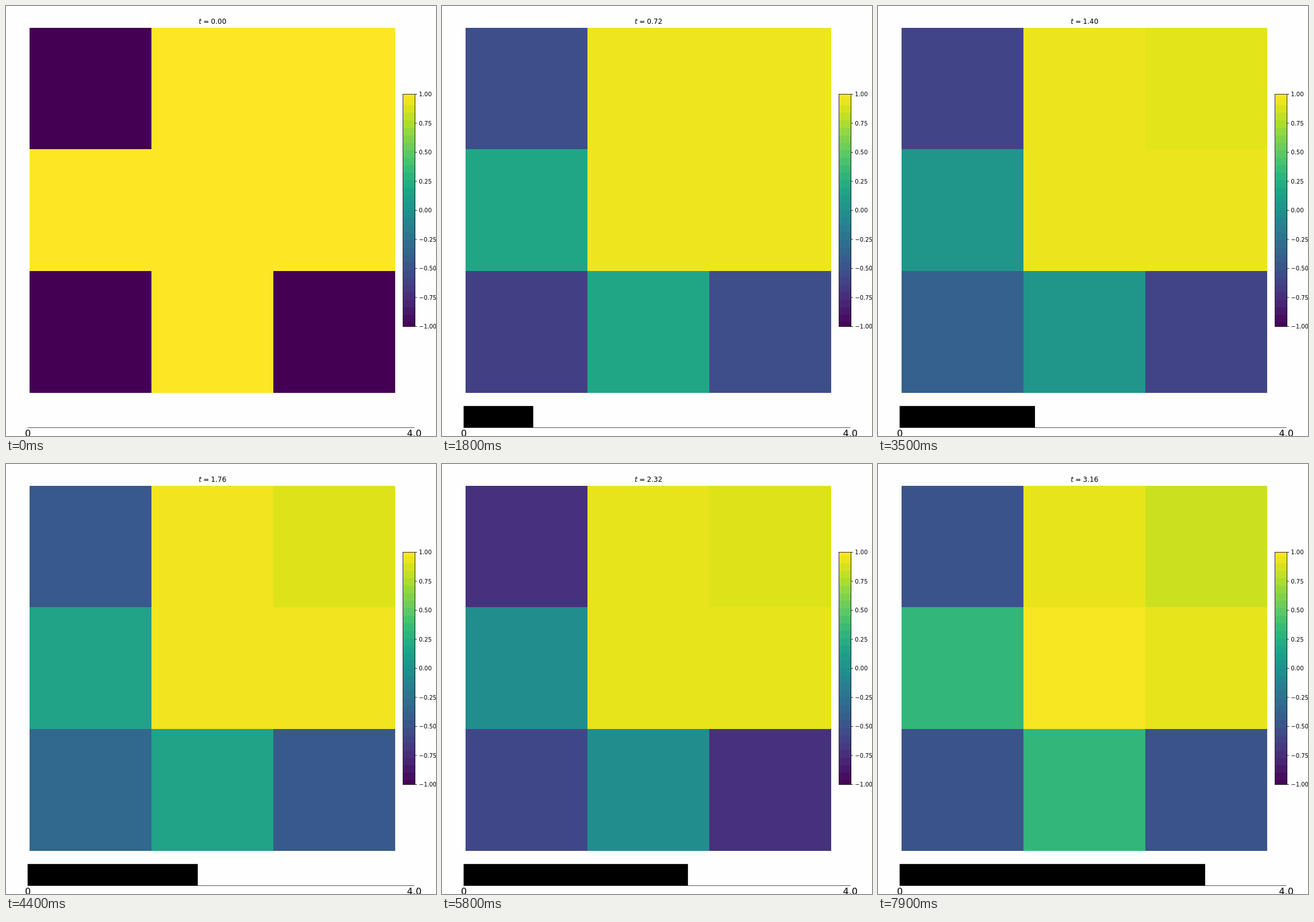
An HTML page that plays this animation: 748x748 px, repeating every 8000 ms.

```html
<!DOCTYPE html>
<html lang="en">
<head>
<meta charset="utf-8">
<title>Lattice evolution</title>
<style>
  html, body { margin: 0; width: 100%; height: 100%; overflow: hidden; background: #fefefe; }
  svg { display: block; width: 100vw; height: 100vh; }
  text { font-family: "DejaVu Sans", sans-serif; fill: #000; white-space: pre; }
</style>
</head>
<body>
<svg id="stage" viewBox="0 0 748 748"></svg>
<script>
const stage = document.getElementById('stage');

function add(tag, attrs, text) {
  const node = document.createElementNS('http://www.w3.org/2000/svg', tag);
  for (const key in attrs) node.setAttribute(key, attrs[key]);
  if (text !== undefined) node.textContent = text;
  stage.appendChild(node);
  return node;
}

// Viridis colour map, evenly spaced stops.
const viridis = ('440154 471365 482475 463480 414487 3b528b 355f8d 2f6c8e 2a788e 25848e 21918c ' +
  '1e9c89 22a884 2fb47c 44bf70 5ec962 7ad151 9bd93c bddf26 dfe318 fde725')
  .split(' ').map(hex => [0, 2, 4].map(i => parseInt(hex.slice(i, i + 2), 16)));

function colour(value) {
  const pos = Math.min(1, Math.max(0, (value + 1) / 2)) * (viridis.length - 1);
  const i = Math.min(viridis.length - 2, Math.floor(pos));
  const mix = viridis[i].map((c, k) => Math.round(c + (viridis[i + 1][k] - c) * (pos - i)));
  return `rgb(${mix})`;
}

// Smooth curve through knots without overshoot.
function curve(xs, ys) {
  const last = xs.length - 1;
  const rise = xs.slice(1).map((x, i) => (ys[i + 1] - ys[i]) / (x - xs[i]));
  const slope = xs.map((x, i) => {
    if (i === 0 || i === last) return 0;
    const a = rise[i - 1], b = rise[i];
    return a * b > 0 ? 2 * a * b / (a + b) : 0;
  });
  return x => {
    let i = 0;
    while (i < last - 1 && x > xs[i + 1]) i++;
    const w = xs[i + 1] - xs[i], u = (x - xs[i]) / w, v = 1 - u;
    return v * v * ((1 + 2 * u) * ys[i] + u * w * slope[i]) +
           u * u * ((1 + 2 * v) * ys[i + 1] - v * w * slope[i + 1]);
  };
}

// Magnetisation of each class of site; the lattice is mirror symmetric.
const times = [0, 0.32, 0.72, 1.12, 1.76, 2.32, 2.72, 3.16];
const sites = {
  end:    [-1, -0.8, -0.53, -0.69, -0.45, -0.72, -0.67, -0.49],
  link:   [1, 0.38, 0.18, -0.04, 0.16, -0.03, 0.42, 0.32],
  corner: [-1, -0.85, -0.625, -0.46, -0.33, -0.58, -0.79, -0.49],
  edge:   [1, 0.965, 0.954, 0.936, 0.955, 0.93, 0.93, 0.925],
  centre: [1, 0.965, 0.954, 0.936, 0.955, 0.93, 0.93, 0.98],
  far:    [1, 0.965, 0.954, 0.936, 0.895, 0.895, 0.87, 0.84]
};
for (const name in sites) sites[name] = curve(times, sites[name]);

const layout = [
  'end', 'edge', 'far',
  'link', 'centre', 'edge',
  'corner', 'link', 'end'
];
const side = 211.9;
const cells = layout.map((name, i) => ({
  value: sites[name],
  node: add('rect', {
    x: 41 + side * (i % 3), y: 37.5 + side * Math.floor(i / 3),
    width: side, height: side, 'shape-rendering': 'crispEdges'
  })
}));

// Title
const title = { y: 31.4, 'font-size': 12 };
add('text', { ...title, x: 335.2, 'font-style': 'italic' }, 't');
add('text', { ...title, x: 343.2 }, '=');
const clock = add('text', { ...title, x: 356.6 });

// Colour bar
const bar = { x: 690.5, y: 153.5, width: 21, height: 404 };
const band = 13;
for (let y = -7; y < bar.height; y += band) {
  const top = Math.max(0, y), bottom = Math.min(bar.height, y + band);
  add('rect', {
    x: bar.x, y: bar.y + top, width: bar.width, height: bottom - top,
    fill: colour(1 - (top + bottom) / bar.height), 'shape-rendering': 'crispEdges'
  });
}
add('rect', { ...bar, fill: 'none', stroke: '#000', 'stroke-width': 0.8 });
for (let i = 0; i <= 8; i++) {
  const value = 1 - i / 4, y = bar.y + bar.height * i / 8;
  add('path', { d: `M711.5 ${y}h3.5`, stroke: '#000', 'stroke-width': 0.8 });
  add('text', { x: 718.3, y: y + 3.6, 'font-size': 10 }, value.toFixed(2).replace('-', '\u2212'));
}

// Progress bar
const unit = 168.2;
add('path', { d: 'M37.6 733.4H710.6', stroke: '#000', 'stroke-width': 0.7 });
const progress = add('rect', { x: 37.6, y: 695.8, height: 37.6, width: 0 });
add('text', { x: 38, y: 749, 'font-size': 16, 'text-anchor': 'middle' }, '0');
add('text', { x: 710.2, y: 749, 'font-size': 16, 'text-anchor': 'middle' }, '4.0');

function draw(ms) {
  const t = Math.floor(ms % 8000 / 100) * 0.04;
  for (const cell of cells) cell.node.setAttribute('fill', colour(cell.value(t)));
  clock.textContent = t.toFixed(2);
  progress.setAttribute('width', unit * t);
}

const start = performance.now();
function tick() {
  draw(performance.now() - start);
  requestAnimationFrame(tick);
}
draw(0);
requestAnimationFrame(tick);
</script>
</body>
</html>
```
